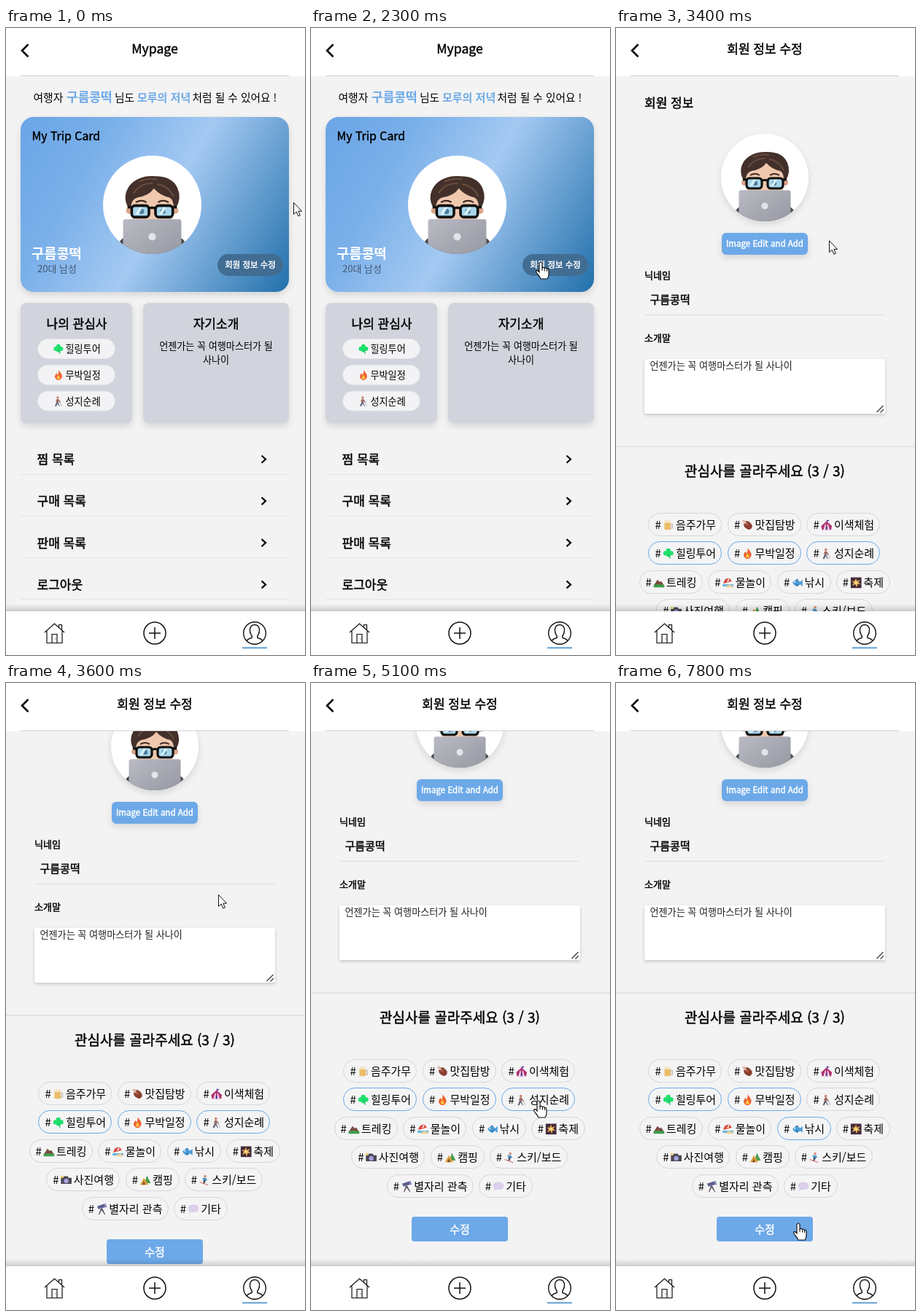
Write an HTML page that moves like this. It is 410 px wide and 860 px high and loops after 8 s.

```html
<!DOCTYPE html>
<html lang="ko">
<head>
<meta charset="utf-8">
<style>
html, body { margin: 0; width: 100%; height: 100%; overflow: hidden; background: #f3f3f3; }
svg { display: block; }
text { font-family: "Noto Sans CJK KR", "Noto Sans CJK", "Noto Sans CJK JP", "Noto Sans", sans-serif; white-space: pre; }
.medium { stroke: currentColor; stroke-width: .45; }
.bold { font-weight: 700; }
.line { fill: none; stroke: #111; }
.shadow { filter: drop-shadow(0 4px 5px rgba(0, 0, 0, .12)); }
</style>
</head>
<body>
<svg id="stage" width="410" height="860" viewBox="0 0 410 860"></svg>
<script>
const BLUE = '#6da9e8', NICK = '구름콩떡', IDOL = '모루의 저녁';

const text = (x, y, size, str, cls = '', fill = '#000', anchor = 'start') =>
  `<text x="${x}" y="${y}" font-size="${size}" class="${cls}" fill="${fill}" color="${fill}" text-anchor="${anchor}">${str}</text>`;
const mid = (x, y, size, str, cls, fill) => text(x, y, size, str, cls, fill, 'middle');
const box = (x, y, w, h, r, fill, extra = '') =>
  `<rect x="${x}" y="${y}" width="${w}" height="${h}" rx="${r}" fill="${fill}" ${extra}/>`;
const path = (d, fill, extra = '') => `<path d="${d}" fill="${fill}" ${extra}/>`;
const stroke = (d, w, color = '#111') => `<path d="${d}" class="line" style="stroke:${color}" stroke-width="${w}"/>`;
const dot = (x, y, r) => `M${x - r} ${y}a${r} ${r} 0 1 0 ${2 * r} 0a${r} ${r} 0 1 0 ${-2 * r} 0z`;
const group = (id, content, extra = '') => `<g id="${id}" ${extra}>${content}</g>`;

// Small pictures on a 14 x 14 box: colour, path, colour, path ...
const icons = {
  beer: ['#cfc9c4', 'M9 5h4v7H9v-2h2V7H9z', '#ecbd66', 'M2 4h8v9H2z', '#f3e4c6', 'M1 4q0-4 4-3 5-1 6 3z'],
  meat: ['#8b3f31', 'M4 2q5-2 9 5 1 5-4 6-7-2-7-7z', '#e0b7a2', 'M0 1l3-1 3 4-2 2z', '#b3604a', dot(7, 6, 1.6)],
  tent: ['#b23273', 'M7 2l7 6-1 5H1L0 8z', '#efdfe9', 'M5 6h1v7H3zM9 6h-1v7h3z', '#5942a0', 'M7 0l4 1-4 2zM6 9h2v4H6z'],
  clover: ['#1fe06c', dot(7, 3.2, 3) + dot(3.4, 6.6, 3) + dot(10.6, 6.6, 3) + dot(7, 8.6, 2.8), '#18b455', 'M7 7l1 0 2 6-1 1z'],
  fire: ['#ee642f', 'M7 0q6 6 5 10-2 4-5 4t-5-4q0-4 3-6 0 3 1 3 2-3 1-7z', '#fcc144', 'M7 7q3 3 2 5-2 2-4 0-1-2 2-5z'],
  walk: ['#c98570', dot(6, 2, 1.8), '#9a6a66', 'M5 4h2l3 4-1 1-2-2v2H4V6L2 8z', '#59607a', 'M4 9h3l2 5H8l-2-4-2 4H2z', '#b9b9c2', 'M9 8h1l2 6h-1z'],
  hill: ['#7a4b44', 'M0 11l5-8 3 3 2-1 4 6z', '#3f9b49', 'M0 10q7-2 14 0v3H0z'],
  beach: ['#62b7e4', 'M0 9h14v3H0z', '#ecd29a', 'M4 12q5-5 10 0v1H4z', '#d8473a', 'M1 8q1-7 8-7l3 4z', '#f4e9e4', 'M5 6l3-5 1 0-1 4z'],
  fish: ['#4a9bd5', 'M1 7q5-7 10-1l3-3v9l-3-3q-5 6-10-2z', '#2f6ea6', 'M5 3q3-2 4 1zM6 9l3 0-2 3z', '#fff', dot(4, 6, .9)],
  spark: ['#432a3c', 'M0 0h14v14H0z', '#e9b452', 'M7 1l1 4 4-2-2 4 3 2-4 0-1 4-2-4-4 2 2-4-3-2 4 0z', '#fff1b8', dot(7, 7, 1.3)],
  camera: ['#4c4854', 'M0 4h3l1-2h5l1 2h4v8H0z', '#a6a3dc', dot(7, 8, 3), '#ecc94d', 'M0 1l3 1 0 2-3 0z'],
  camp: ['#4b9b4e', 'M9 1l5 10H6z', '#e0a03c', 'M5 4l6 9H0z', '#7c4f2b', 'M5 8l2 5H3z'],
  ski: ['#d99073', dot(8, 2, 1.8), '#4c9bcf', 'M4 4h5l2 3-3 1-2-1z', '#46506e', 'M5 7h4l-2 5H5l1-3z', '#d45b58', 'M1 9l11 4 0 1L1 10z'],
  scope: ['#5a608e', 'M1 3l9-3 2 4-9 3z', '#8b91b8', 'M10 0l2-1 2 5-2 1z', '#53505c', 'M6 6h2l4 8h-1L7 8l-3 6H3z'],
  talk: ['#dccfea', 'M7 1q7 0 7 5t-7 5q-2 0-3 0l-3 2 1-3q-2-1-2-4 0-5 7-5z']
};
const icon = (name, x, y, s = 1) => {
  const p = icons[name];
  let out = '';
  for (let i = 0; i < p.length; i += 2) out += path(p[i + 1], p[i]);
  return `<g transform="translate(${x} ${y}) scale(${s})">${out}</g>`;
};

const avatar = (x, y, r, cls = '') => `<g transform="translate(${x} ${y}) scale(${r / 60})">
  <circle r="60" fill="#fff" class="${cls}"/><g clip-path="url(#disc)">` +
  path('M-43 60Q-43 44-34 40H34Q43 44 43 60z', '#4b4b52') +
  path(dot(-28, 7, 4) + dot(28, 7, 4), '#dba58a') +
  path('M-26-12Q0-32 26-12V12Q22 34 0 36-22 34-26 12z', '#f0c8ae') +
  path('M-29 4Q-37-10-28-23-17-36 3-35 25-35 31-20 36-8 29 4L26 2Q26-6 21-9 10-11 2-20-4-11-18-9-25-7-26 2z', '#43302a') +
  path('M-23-14Q-14-27 1-26M6-25Q20-23 26-10M-16-28Q-6-33 6-31', 'none', 'stroke="#664a3c" stroke-width="2"') +
  path('M-20-3q7-4 13 0M7-3q6-4 13 0', 'none', 'stroke="#3d2a23" stroke-width="2"') +
  box(-25, 1, 21, 14, 4, '#a9d6ea') + box(4, 1, 21, 14, 4, '#a9d6ea') +
  path(dot(-13, 8, 3.2) + dot(13, 8, 3.2), '#4d7d9c') +
  path('M-21 12l6-10h4l-6 10zM8 12l6-10h4l-6 10z', '#d8f1fa') +
  box(-25, 1, 21, 14, 4, 'none', 'stroke="#111" stroke-width="3.2"') +
  box(4, 1, 21, 14, 4, 'none', 'stroke="#111" stroke-width="3.2"') +
  stroke('M-5 5q5-3 10 0M-30 3h5M25 3h5', 3) +
  box(-35.500, 17.500, 71, 50, 3, 'url(#metal)') +
  `<circle cy="39" r="4.500" fill="#e3e4ea"/></g></g>`;

function myPage() {
  const pills = [['clover', '힐링투어'], ['fire', '무박일정'], ['walk', '성지순례']];
  const menu = ['찜 목록', '구매 목록', '판매 목록', '로그아웃'];
  return mid(204, 35, 17.6, 'Mypage', 'medium') +
    text(37.5, 101, 14.8, '여행자') + text(83, 101, 17, NICK, 'bold', BLUE) + text(149, 101, 14.8, '님도') +
    text(180, 101, 15, IDOL, 'bold', BLUE) + text(255.5, 101, 14.7, '처럼 될 수 있어요 !') +
    box(20, 122, 368, 240, 18, 'url(#card)', 'class="shadow"') +
    text(35.5, 154, 15.8, 'My Trip Card', 'medium') +
    avatar(200.5, 242.5, 67.5) +
    text(35, 316, 18.7, NICK, 'bold', '#fff') + text(43, 335, 13, '20대 남성', '', '#41566f') +
    box(290, 310, 90, 30, 15, '#416d93') + mid(335, 329, 11.4, '회원 정보 수정', 'medium', '#fff') +
    box(20, 377, 153, 165, 8, '#d1d4dc', 'class="shadow"') +
    box(188, 377, 200, 165, 8, '#d1d4dc', 'class="shadow"') +
    mid(97, 411.5, 17, '나의 관심사', 'medium') + mid(288, 411.5, 17, '자기소개', 'medium') +
    mid(288, 440.5, 13.1, '언젠가는 꼭 여행마스터가 될') + mid(288, 459.5, 13.1, '사나이') +
    pills.map(([name, label], i) => {
      const y = 426.5 + i * 35.8;
      return box(43.5, y, 106, 27, 13.5, '#f3f3f5', 'stroke="#e2e3e8"') + icon(name, 65, y + 7, .98) + text(81.5, y + 18.5, 13.1, label);
    }).join('') +
    menu.map((label, i) => {
      const y = 591.5 + i * 57.3;
      return text(42.5, y + 6.5, 17, label, 'medium') + stroke(`M350.5 ${y - 5}l5.5 5-5.5 5`, 2.3) +
        stroke(`M20 ${Math.floor(y + 20.5) + .5}H388`, 1, '#e4e4e4');
    }).join('');
}

const tagRows = [
  [['beer', '음주가무'], ['meat', '맛집탐방'], ['tent', '이색체험']],
  [['clover', '힐링투어'], ['fire', '무박일정'], ['walk', '성지순례']],
  [['hill', '트레킹'], ['beach', '물놀이'], ['fish', '낚시'], ['spark', '축제']],
  [['camera', '사진여행'], ['camp', '캠핑'], ['ski', '스키/보드']],
  [['scope', '별자리 관측'], ['talk', '기타']]
];
function tags() {
  const gap = 7.3;
  const width = label => 46 + [...label].reduce((w, c) => w + (c === ' ' ? 3.6 : c === '/' ? 5.9 : 13.8), 0);
  return tagRows.map((row, i) => {
    const total = row.reduce((sum, [, label]) => sum + width(label) + gap, -gap);
    let x = 204 - total / 2;
    const y = Math.floor(665 + i * 39.6);
    return row.map(([name, label]) => {
      const w = width(label);
      const tag = box(Math.floor(x) + .5, y + .5, Math.round(w) - 1, 31, 15.5, '#f4f4f5', `id="tag-${name}" stroke="#d5d6dd"`) +
        text(x + 8.5, y + 21.5, 15, '#') + icon(name, x + 19.5, y + 9.5, 1.05) + text(x + 37, y + 21.5, 15, label);
      x += w + gap;
      return tag;
    }).join('');
  }).join('');
}

function editForm() {
  return text(39, 108.5, 17, '회원 정보', 'medium') + avatar(204, 205, 60, 'shadow') +
    box(145, 281, 118, 30, 6, BLUE, 'class="shadow"') + mid(204, 300, 11.5, 'Image Edit and Add', 'medium', '#fff') +
    text(39, 344, 13, '닉네임', 'medium') + text(46.5, 377.5, 15, NICK, 'medium') +
    stroke('M39 393.5H369', 1, '#dedee0') + text(39, 430, 13, '소개말', 'medium') +
    box(39, 454, 330, 75, 2, '#fff', 'style="filter:drop-shadow(0 2px 2px rgba(0,0,0,.18))"') +
    text(46.5, 468, 13.1, '언젠가는 꼭 여행마스터가 될 사나이', '', '#222') +
    stroke('M357.5 527l9-9M362.5 527.5l4.5-4.5', 1.4, '#444') +
    stroke('M0 574H410', 2, '#e2e3e6') +
    `<text id="count" x="204" y="615" font-size="19" class="medium" text-anchor="middle"></text>` +
    group('tags', tags()) +
    group('submit', box(138, 684, 132, 34, 4, BLUE) + mid(204, 707, 15, '수정', 'medium', '#fff'));
}

const nav = box(0, 790, 410, 10, 0, 'url(#navShade)') + box(0, 800, 410, 60, 0, '#fff') +
  stroke('M53 829L66.5 817 80 829M56 827V843.5H77V827M63 843V831.5H70V843M72.500 822V818.500H76.500V826M67.5 838h1', 1.2) +
  stroke(dot(204, 830, 15) + 'M196 830h16M204 822v16', 1.5) +
  stroke(dot(341, 830, 15.3) + 'M330 841Q331 838 337 836.5 338 834 336 832 334 829 334.5 824 336 818.5 341 818.5T347.5 824Q348 829 346 832 344 834 345 836.5 351 838 352 841', 1.4) +
  box(324, 849, 34, 2.4, 0, '#78add9');

const arrow = path('M.5.5V16.5L4.2 13 6.8 19 9.3 18 6.8 12.2H11.5z', '#fff', 'stroke="#111"');
const hand = path('M-2 1.5Q0-1.5 2 1.5V8Q4 6.5 5.5 8.5 7.5 7.5 8.5 9.5 11 9 11 12V17Q11 20 9 23H0Q-2 19-4 17-6 15-6.5 12.5-5 10-2 14z',
  '#fff', 'stroke="#111" stroke-width="1.2"') + stroke('M2 8v4M5.5 9v3.5M8.5 10v3', 1);

const stage = document.getElementById('stage');
stage.innerHTML = `<defs>
  <linearGradient id="card" gradientUnits="userSpaceOnUse" x1="14" y1="132" x2="394" y2="352">
    <stop stop-color="#6ba5e7"/><stop offset=".25" stop-color="#79afe9"/><stop offset=".53" stop-color="#a4c9f2"/><stop offset="1" stop-color="#2270ab"/></linearGradient>
  <linearGradient id="metal" x2="1" y2="1"><stop stop-color="#b9bac3"/><stop offset="1" stop-color="#9496a0"/></linearGradient>
  <linearGradient id="navShade" x2="0" y2="1"><stop stop-color="#000" stop-opacity="0"/><stop offset="1" stop-opacity=".16"/></linearGradient>
  <clipPath id="disc"><circle r="60"/></clipPath>
  <clipPath id="view"><rect y="66" width="410" height="734"/></clipPath>
</defs>` +
  box(0, 0, 410, 860, 0, '#f3f3f3') + box(0, 0, 410, 66, 0, '#fff') +
  stroke('M20 65.5H388', 1, '#d2d2d2') + stroke('M30.5 22.5L22 31l8.5 8.5', 2.7) +
  group('profile', myPage()) +
  group('edit', mid(204, 35, 17, '회원 정보 수정', 'medium') + `<g clip-path="url(#view)">${group('form', editForm())}</g>`) +
  nav + group('arrow', arrow) + group('hand', hand);

const el = id => document.getElementById(id);
const show = (id, on) => el(id).setAttribute('visibility', on ? 'visible' : 'hidden');
const move = (id, x, y) => el(id).setAttribute('transform', `translate(${x} ${y})`);
const smooth = u => u * u * (3 - 2 * u);
const clamp = u => Math.max(0, Math.min(1, u));

// time, x, y of the pointer tip
const pointer = [
  [0, 394, 239], [200, 394, 239], [1200, 317, 307], [1500, 315, 321], [2600, 315, 321],
  [2950, 310, 313], [3100, 310, 313], [3450, 291, 290], [3700, 291, 290], [4000, 291, 299],
  [4450, 300, 545], [4900, 312, 573], [5600, 312, 573], [6100, 265, 609],
  [6450, 265, 609], [6950, 250, 741], [8000, 250, 741]
];
function pointerAt(t) {
  const i = pointer.findIndex((p, k) => k > 0 && t <= p[0]);
  const [t0, x0, y0] = pointer[i - 1], [t1, x1, y1] = pointer[i];
  const u = smooth((t - t0) / (t1 - t0));
  return [x0 + (x1 - x0) * u, y0 + (y1 - y0) * u];
}

function draw(now) {
  const t = now % 8000;
  const editing = t >= 2700, loaded = t >= 3100;
  el('profile').style.display = editing ? 'none' : '';
  el('edit').style.display = editing ? '' : 'none';
  el('tags').style.display = loaded ? '' : 'none';
  move('submit', 0, loaded ? 197 : 0);
  move('form', 0, -Math.round(149 * smooth(clamp((t - 3400) / 284))));

  const chosen = { clover: loaded, fire: loaded, walk: loaded && t < 5500, fish: t >= 6400 };
  let count = 0;
  for (const name in chosen) {
    el('tag-' + name).setAttribute('stroke', chosen[name] ? BLUE : '#d5d6dd');
    count += chosen[name];
  }
  el('count').textContent = `관심사를 골라주세요 (${count} / 3)`;

  const [x, y] = pointerAt(t);
  const pointing = (t > 1270 && t < 2700) || t > 4500;
  show('hand', pointing);
  show('arrow', !pointing);
  move('hand', x, y);
  move('arrow', x, y);
}
function tick() {
  draw(performance.now());
  requestAnimationFrame(tick);
}
tick();
</script>
</body>
</html>
```
